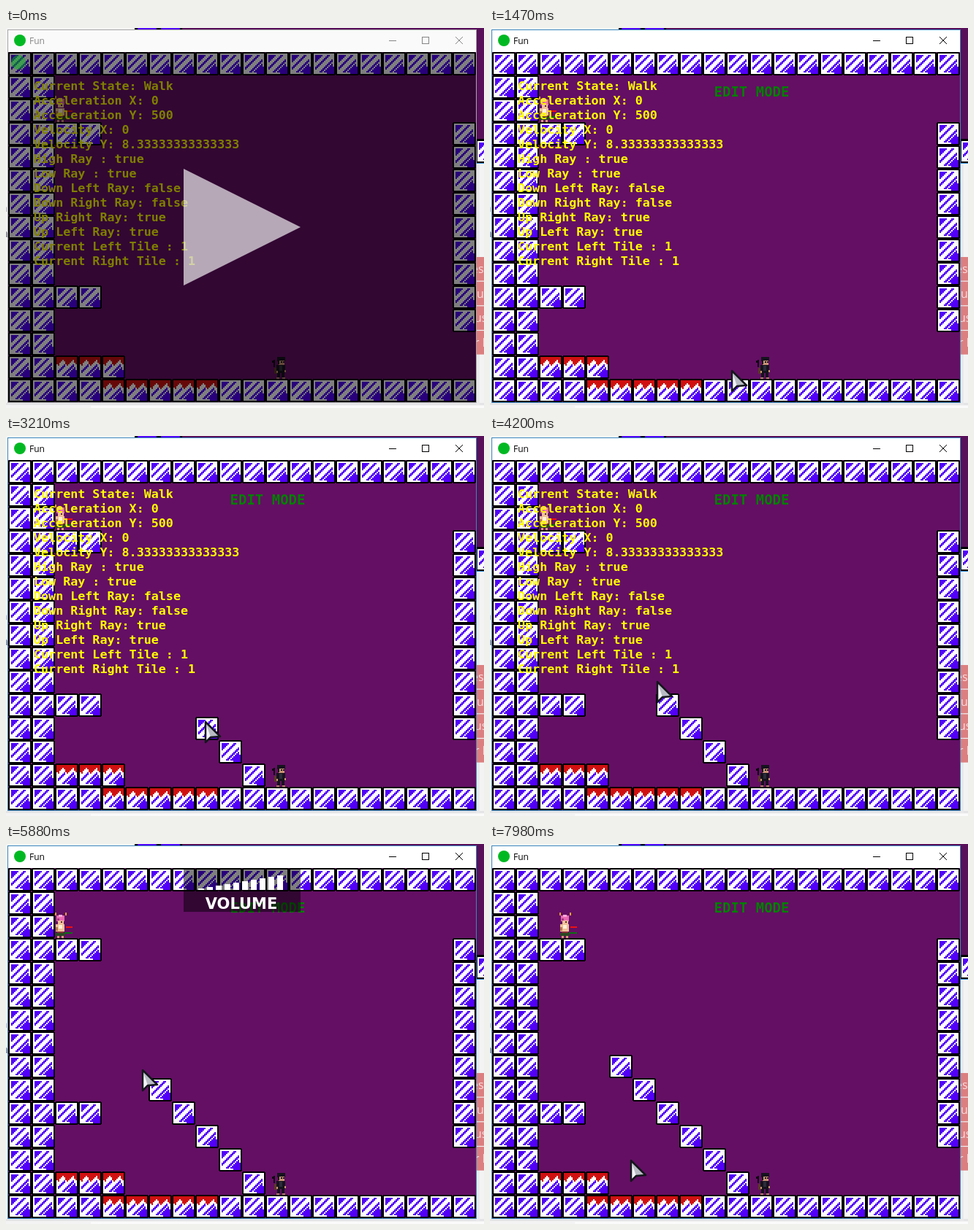
An HTML page with a canvas that plays this animation: 654 px wide and 521 px high, repeating every 8000 ms.

```html
<!DOCTYPE html>
<html lang="en">
<head>
<meta charset="utf-8">
<title>Fun</title>
<style>
html, body { margin: 0; width: 100%; height: 100%; overflow: hidden; background: #fff; }
canvas { display: block; }
</style>
</head>
<body>
<canvas id="stage" width="654" height="521"></canvas>
<script>
const ctx = document.getElementById('stage').getContext('2d');
const LOOP = 8000, TILE = 32, LEFT = 3, TOP = 33;
const PURPLE = '#640f64', BLUE = '#5200f8', RED = '#d01010';
const MONO = '"DejaVu Sans Mono", monospace';
const SANS = '"Open Sans", sans-serif';

const ACTIVE_AT = 420, RESUME_AT = 480, EDIT_AT = 990;
const DEBUG_OFF = 5400, TRAY_SLIDE = 6400, WALK_AT = 7530;

const debugLines = [
  'Current State: Walk', 'Acceleration X: 0', 'Acceleration Y: 500',
  'Velocity X: 0', 'Velocity Y: 8.33333333333333', 'High Ray : true',
  'Low Ray : true', 'Down Left Ray: false', 'Down Right Ray: false',
  'Up Right Ray: true', 'Up Left Ray: true',
  'Current Left Tile : 1', 'Current Right Tile : 1'
];

// Times at which the staircase blocks appear, bottom right to top left.
const blockTimes = [1740, 2460, 3030, 4020, 4620, 6270];

// Pointer path: time, x, y.
const pointerPath = [
  [660, 656, -6], [1440, 330, 464], [1470, 330, 468], [1680, 330, 468],
  [1740, 333, 460], [2070, 333, 460], [2460, 302, 425], [2640, 302, 425],
  [3030, 272, 390], [3210, 272, 390], [3990, 237, 352], [4200, 228, 335],
  [4350, 204, 321], [5190, 204, 321], [5400, 204, 329], [5880, 186, 308],
  [6000, 186, 308], [6270, 172, 302], [6690, 252, 414], [6780, 240, 430],
  [6960, 192, 432]
];

function rect(color, x, y, w, h, c = ctx) {
  c.fillStyle = color;
  c.fillRect(x, y, w, h);
}

function text(str, x, y, font, color, align = 'left') {
  ctx.font = font;
  ctx.fillStyle = color;
  ctx.textAlign = align;
  ctx.textBaseline = 'alphabetic';
  ctx.fillText(str, x, y);
}

function disc(color, x, y, r) {
  ctx.fillStyle = color;
  ctx.beginPath();
  ctx.arc(x, y, r, 0, Math.PI * 2);
  ctx.fill();
}

function polygon(points) {
  ctx.beginPath();
  points.forEach(([x, y]) => ctx.lineTo(x, y));
  ctx.closePath();
}

function makeTile(bloody) {
  const tile = document.createElement('canvas');
  tile.width = tile.height = TILE;
  const c = tile.getContext('2d');
  rect('#000', 1, 0, 30, 32, c);
  rect('#000', 0, 1, 32, 30, c);
  for (let y = 1; y < 15; y++) {
    for (let x = 1; x < 15; x++) {
      const s = x + y;
      const rim = (x === 1 || y === 1 || x === 14 || y === 14) && s < 24;
      const stripe = (s > 8 && s < 12) || (s > 13 && s < 18) || s === 20;
      let color = rim || stripe ? '#fff' : BLUE;
      if (bloody) {
        const depth = 4 + Math.round(1.7 * Math.sin(x * 0.95));
        if (y <= depth) color = RED;
        else if (y <= depth + 2) color = '#fff';
      }
      rect(color, x * 2, y * 2, 2, 2, c);
    }
  }
  return tile;
}

const block = makeTile(false), spikes = makeTile(true);

function put(tile, col, row) {
  ctx.drawImage(tile, LEFT + col * TILE, TOP + row * TILE);
}

function drawLevel(t) {
  rect(PURPLE, LEFT, TOP, 640, 480);
  for (let col = 0; col < 20; col++) {
    put(block, col, 0);
    put(col > 3 && col < 9 ? spikes : block, col, 14);
  }
  for (let row = 1; row < 14; row++) {
    put(block, 0, row);
    put(block, 1, row);
    if (row > 2 && row < 12) put(block, 19, row);
  }
  for (const col of [2, 3]) {
    put(block, col, 3);
    put(block, col, 10);
  }
  for (const col of [2, 3, 4]) put(spikes, col, 13);
  blockTimes.forEach((at, i) => { if (t >= at) put(block, 10 - i, 13 - i); });
}

function drawPlayer() {
  const p = (color, x, y, w, h) => rect(color, 363 + x, 451 + y, w, h);
  p('#0c0a10', 1, 5, 2, 3);
  p('#0c0a10', 3, 4, 2, 10);
  p('#5c3828', 4, 15, 5, 8);
  p('#15131c', 8, 0, 11, 6);
  p('#c89474', 10, 5, 8, 6);
  p('#15131c', 9, 4, 2, 6);
  p('#15131c', 13, 6, 2, 2);
  p('#15131c', 16, 6, 2, 2);
  p('#15131c', 7, 11, 12, 11);
  p('#2c2c3a', 11, 12, 4, 7);
  p('#c89474', 7, 19, 2, 3);
  p('#c89474', 18, 18, 2, 3);
  p('#15131c', 8, 22, 4, 6);
  p('#15131c', 14, 22, 4, 6);
  p('#b08068', 7, 28, 4, 2);
  p('#b08068', 15, 28, 4, 2);
}

function drawEnemy(t) {
  const walk = Math.max(0, t - WALK_AT) / (LOOP - WALK_AT);
  const left = 67 + Math.round(walk * 29);
  const bob = Math.floor(t / 450) % 2;
  const p = (color, x, y, w, h) => rect(color, left + x, 93 + y, w, h);
  p('#e0a030', 0, bob, 2, 4);
  p('#e0a030', 14, bob, 2, 4);
  p('#e868b0', 2, 4 + bob, 11, 8);
  p('#f8a8d8', 5, 3 + bob, 5, 3);
  p('#a83880', 3, 8 + bob, 3, 3);
  p('#f0c098', 4, 11 + bob, 8, 5);
  p('#602838', 8, 12 + bob, 2, 2);
  p('#f0c098', 1, 17, 12, 10);
  p('#b87850', 1, 21, 3, 5);
  p('#fff0d8', 5, 18, 5, 5);
  p('#883038', 3, 27, 9, 2);
  p('#284820', 1, 29, 13, 4);
  p('#d89870', 3, 33, 3, 3);
  p('#d89870', 9, 33, 3, 3);
  p('#201018', 2, 36, 4, 2);
  p('#201018', 9, 36, 4, 2);
  p('#f01010', 15, 20, 9, 2);
  p('#087010', 13, 28, 11, 2);
}

function drawTray(t) {
  if (t < DEBUG_OFF) return;
  const y = TOP - Math.max(0, t - TRAY_SLIDE) * 0.96;
  if (y < TOP - 60) return;
  rect('rgba(0,0,0,.5)', 243, y, 160, 60);
  for (let i = 0; i < 10; i++) {
    rect('#fff', 263 + i * 12, y + 28 - i * 2, 8, 2 + i * 2);
  }
  text('VOLUME', 322, y + 56, 'bold 21px "DejaVu Sans", sans-serif', '#fff', 'center');
}

function pointerAt(t) {
  if (t < pointerPath[0][0]) return null;
  const next = pointerPath.findIndex(key => key[0] > t);
  if (next < 0) return pointerPath[pointerPath.length - 1].slice(1);
  const [t0, x0, y0] = pointerPath[next - 1], [t1, x1, y1] = pointerPath[next];
  const u = (t - t0) / (t1 - t0), k = u * u * (3 - 2 * u);
  return [Math.round(x0 + (x1 - x0) * k), Math.round(y0 + (y1 - y0) * k)];
}

function drawPointer(t) {
  const pos = pointerAt(t);
  if (!pos) return;
  ctx.save();
  ctx.translate(...pos);
  polygon([[1, 2], [1, 30], [8, 23], [21, 22]]);
  ctx.fillStyle = '#b9bcc4';
  ctx.fill();
  polygon([[1, 2], [1, 30], [8, 23]]);
  ctx.fillStyle = '#f2f3f6';
  ctx.fill();
  polygon([[1, 2], [1, 30], [8, 23], [21, 22]]);
  ctx.strokeStyle = '#14161c';
  ctx.lineWidth = 2.5;
  ctx.lineJoin = 'round';
  ctx.stroke();
  ctx.restore();
}

function drawPause() {
  rect('rgba(0,0,0,.5)', LEFT, TOP, 640, 480);
  polygon([[243, 193], [403, 273], [243, 353]]);
  ctx.fillStyle = 'rgba(255,255,255,.65)';
  ctx.fill();
  disc('rgba(0,185,34,.5)', 17, 47, 10);
}

function drawDesktop() {
  rect('#f3f3f3', 0, 0, 654, 521);
  rect('#e4e4e6', 0, 514, 654, 3);
  rect('#fafafa', 116, 518, 538, 3);
  rect('#58105a', 241, 0, 413, 153);
  rect('#000', 176, 0, 65, 3);
  rect(BLUE, 180, 0, 26, 2);
  rect(BLUE, 212, 0, 26, 2);
  rect('#000', 643, 152, 11, 34);
  ctx.drawImage(block, 643, 153);
  rect('#2a8cd8', 643, 185, 11, 1);
  rect('#e9e9eb', 643, 187, 5, 330);
  text('n', -7, 252, '14px ' + SANS, '#667');
  text('a', -5, 287, '14px ' + SANS, '#667');
  [['ess', 637], ['u', 644], ['us', 641], ['r l', 641]].forEach(([word, x], i) => {
    const y = 314 + i * 33.7;
    rect('#dc7f80', 643, y, 11, 32.5);
    text(word, x, y + 22, '16px ' + SANS, '#f8dede');
  });
}

function drawFrame(active) {
  rect(active ? '#3a86bd' : '#a6a6a8', 2, 2, 642, 512);
  rect(active ? '#fff' : '#fafafa', 3, 3, 640, 30);
  disc('#00b922', 19, 17, 8);
  const ink = active ? '#000' : '#858585';
  text('Fun', 32, 22, '12px ' + SANS, ink);
  ctx.strokeStyle = ink;
  ctx.lineWidth = 1;
  ctx.strokeRect(569.5, 12.5, 9, 9);
  ctx.beginPath();
  ctx.moveTo(524, 17.5);
  ctx.lineTo(534, 17.5);
  ctx.moveTo(615, 12);
  ctx.lineTo(625, 22);
  ctx.moveTo(625, 12);
  ctx.lineTo(615, 22);
  ctx.stroke();
}

function drawGame(t) {
  ctx.save();
  ctx.beginPath();
  ctx.rect(LEFT, TOP, 640, 480);
  ctx.clip();
  drawLevel(t);
  drawEnemy(t);
  drawPlayer();
  if (t < DEBUG_OFF) {
    debugLines.forEach((line, i) =>
      text(line, 38, 85 + i * 20, 'bold 16.7px ' + MONO, '#ffff00'));
  }
  if (t >= EDIT_AT) text('EDIT MODE', 358, 94, 'bold 19px ' + MONO, '#008000', 'center');
  drawTray(t);
  if (t < RESUME_AT) drawPause();
  ctx.restore();
}

function render(now) {
  const t = now % LOOP;
  drawDesktop();
  drawFrame(t >= ACTIVE_AT);
  drawGame(t);
  drawPointer(t);
  requestAnimationFrame(render);
}

const start = performance.now();
render(0);
function render0() { return performance.now() - start; }
</script>
</body>
</html>
```
